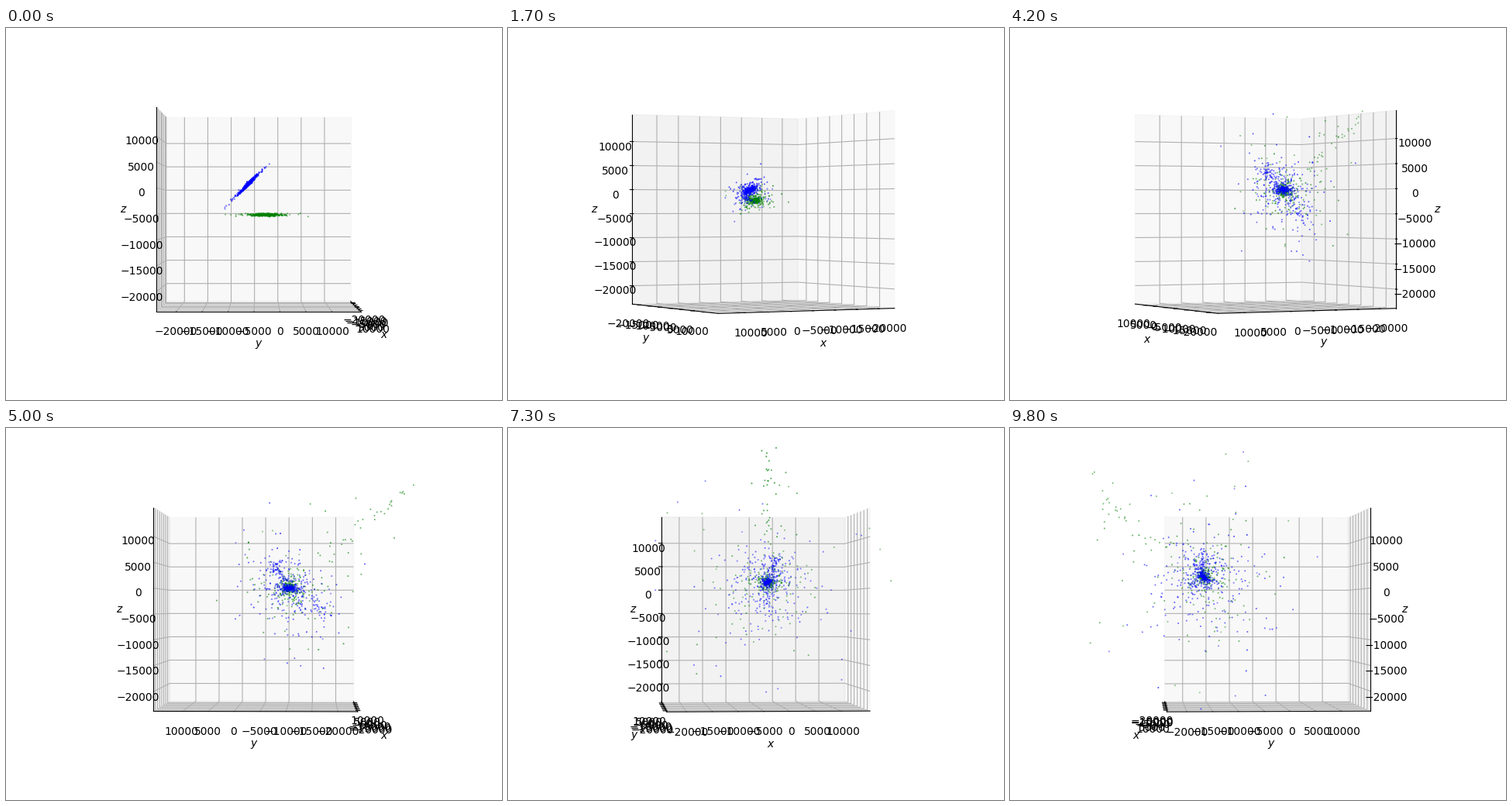
Recreate the animation shown at these times as a matplotlib script. Size 640 by 480 pixels, loop 9900 ms.

```python
import numpy as np
import matplotlib.pyplot as plt
from matplotlib.animation import FuncAnimation
from matplotlib.collections import LineCollection
from matplotlib.patches import Polygon, Rectangle

FRAMES, STEP_MS = 99, 100
W, H = 640, 480
VIEW = 0.924 * H                 # side of the square viewport, px
SHIFT = VIEW * (0.95 / 1.85 - 0.5)
CX, CY = W / 2 + SHIFT, H / 2 - SHIFT
DIST, ZOOM = 10, VIEW / 0.185
MID, SPAN = -4110, 37850         # data range of every axis
EDGE = 0.5 + 1 / 48
DELTA = 1 / 12
PER_POINT = 48 / (72 * 2 * VIEW / 100) * DELTA
TICK_OUT, LABEL_OUT = 11.5 * PER_POINT, 25 * PER_POINT
TICKS = np.arange(-20000, 10001, 5000)
UNITS = (TICKS - MID) / SPAN

rng = np.random.default_rng(12)

plt.rcParams["font.family"] = "DejaVu Sans"
fig = plt.figure(figsize=(6.4, 4.8), dpi=100, facecolor="white")
ax = fig.add_axes([0, 0, 1, 1])
ax.set_xlim(0, W)
ax.set_ylim(H, 0)
ax.axis("off")


def project(points, azim):
    """Perspective view at zero elevation: pixel x, pixel y, depth."""
    p = np.asarray(points, float)
    s, c = np.sin(azim), np.cos(azim)
    depth = c * p[..., 0] + s * p[..., 1]
    k = ZOOM / (DIST - depth)
    across = c * p[..., 1] - s * p[..., 0]
    return CX + across * k, CY - p[..., 2] * k, depth


def pixels(points, azim):
    x, y, _ = project(points, azim)
    return np.stack([x, y], axis=-1)


def unit(v):
    return v / np.linalg.norm(v, axis=-1, keepdims=True)


def smooth(u):
    u = np.clip(u, 0, 1)
    return u * u * (3 - 2 * u)


def track(t, times, keys):
    return np.array([np.interp(t, times, k) for k in np.transpose(keys)])


# ---- galaxies -------------------------------------------------------------

TAIL_TIMES = [1.0, 3.3, 5.0, 6.3, 8.4, 9.8]


class Galaxy:
    def __init__(self, n, scale, e1, e2, tails):
        self.e1, self.e2 = np.array(e1), np.array(e2)
        self.r = np.sort(rng.gamma(2, scale, n))
        self.phi = rng.uniform(0, 2 * np.pi, n)
        self.jitter = rng.normal(0, 140, (n, 3))
        bulge = 900 * np.abs(rng.normal(size=n))
        halo = 4200 * np.exp(0.75 * rng.normal(size=n))
        self.R = np.sort(np.where(rng.random(n) < 0.45, bulge, halo))
        self.R = np.minimum(self.R, 18000)
        self.u = unit(rng.normal(size=(n, 3)))
        self.v = unit(np.cross(self.u, rng.normal(size=(n, 3))))
        self.tails = []
        free = rng.permutation(n)
        for count, spread, keys in tails:
            idx, free = free[:count], free[count:]
            self.R[idx] = spread * np.abs(rng.normal(size=count))
            lag = rng.uniform(0.4, 1.35, (count, 1))
            self.tails.append((idx, lag, keys))

    def offsets(self, t):
        a = (self.phi + 2500 * t / (self.r + 900))[:, None]
        disk = self.r[:, None] * (np.cos(a) * self.e1 + np.sin(a) * self.e2)
        b = (self.phi + 2500 * t / (self.R + 600))[:, None]
        size = self.R * (1 + 0.2 * (t - 5) * self.R / (self.R + 5000))
        halo = size[:, None] * (np.cos(b) * self.u + np.sin(b) * self.v)
        w = smooth((t - 0.5) / 2.7)
        out = (disk + self.jitter) * (1 - w) + halo * w
        for idx, lag, keys in self.tails:
            out[idx] += lag * track(t, TAIL_TIMES, keys)
        return out


plume = [(0, 0, 0), (-3200, -5800, 7300), (-700, -18700, 15600),
         (1300, -19700, 20000), (-4700, -18100, 17500), (-3700, -16000, 12400)]
upper_arm = [(0, 0, 0), (4000, 2500, 2200), (0, 2400, 4000),
             (1500, -1500, 4500), (500, 1000, 2500), (0, 0, 3000)]
lower_arm = [(0, 0, 0), (0, -500, -5500), (0, -6300, -4000),
             (0, 1000, -5500), (0, 500, -3000), (0, -2000, -2000)]

D = np.sqrt(0.5)
green = Galaxy(400, 1100, (1, 0, 0), (0, 1, 0), [(38, 4800, plume)])
blue = Galaxy(600, 850, (1, 0, 0), (0, D, D),
              [(65, 2000, upper_arm), (60, 3800, lower_arm)])


def cores(t):
    """Both centres, measured from the middle of the cube."""
    middle = np.array([700, -220 - 1205 * t, 2054 + 460 * t])
    gap = track(t, [0, 1.7, 3.3, 4.6],
                [(0, -3636, 6320), (600, -900, 2054), (900, 300, 950), (0, 0, 0)])
    return middle - gap / 2, middle + gap / 2


def flatten_core(x, y, centre, t):
    """Squeeze the inner stars into a slowly turning bar."""
    tilt = np.radians(np.interp(t, [0, 1.7, 3.3, 6.3, 8.4, 9.8],
                                [45, 34, 0, 0, 80, 135]))
    dx, dy = x - centre[0], y - centre[1]
    q = dx * np.sin(tilt) + dy * np.cos(tilt)
    cut = 0.6 * min(1, t / 1.5) * np.exp(-(dx**2 + dy**2) / 200)
    return x - cut * q * np.sin(tilt), y - cut * q * np.cos(tilt)


# ---- artists --------------------------------------------------------------

panes = []
for grey in (0.95, 0.90, 0.925):
    pane = Polygon(np.zeros((4, 2)), closed=True, lw=1, alpha=0.5,
                   fc=(grey,) * 3, ec=(grey,) * 3, zorder=1)
    panes.append(ax.add_patch(pane))

grid = LineCollection([], colors="#b0b0b0", linewidths=0.8, zorder=2)
marks = LineCollection([], colors="black", linewidths=0.8, zorder=3)
ax.add_collection(grid, autolim=False)
ax.add_collection(marks, autolim=False)
spines = [ax.plot([], [], color="black", lw=0.8, zorder=3)[0] for _ in range(3)]

tick_texts = [[ax.text(0, 0, str(v).replace("-", "\u2212"), fontsize=10,
                       ha="center", va="top", zorder=4) for v in TICKS]
              for _ in range(3)]
names = [ax.text(0, 0, f"${n}$", fontsize=10, ha="center", va="center", zorder=4)
         for n in "xyz"]

window = Rectangle(((W - VIEW) / 2, (H - VIEW) / 2), VIEW, VIEW,
                   transform=ax.transData)


def star_field(z):
    dots = ax.scatter([], [], s=2.2, linewidths=0, zorder=z)
    dots.set_clip_path(window)
    return dots


green_dots, blue_dots = star_field(5), star_field(6)


def moved_out(p, axis, amount):
    q = p.copy()
    for i in range(3):
        if i != axis:
            q[i] += amount if q[i] >= 0 else -amount
    return q


def draw_cube(azim):
    back = np.array([EDGE if np.cos(azim) < 0 else -EDGE,
                     EDGE if np.sin(azim) < 0 else -EDGE, -EDGE])
    grid_lines, tick_lines = [], []
    for i in range(3):
        j, k = [n for n in range(3) if n != i]

        corners = np.tile(back, (4, 1))
        corners[:, j] = np.array([-1, 1, 1, -1]) * EDGE
        corners[:, k] = np.array([-1, -1, 1, 1]) * EDGE
        panes[i].set_xy(pixels(corners, azim))

        # The spine sits on the edge flipped away from the back corner.
        side = 1 if i == 0 else 0
        edge = back.copy()
        edge[side] *= -1
        ends = np.tile(edge, (2, 1))
        ends[:, i] = -EDGE, EDGE
        spines[i].set_data(*pixels(ends, azim).T)

        sign = np.sign(back[side])
        for u, text in zip(UNITS, tick_texts[i]):
            path = np.tile(back, (3, 1))
            path[0, j] *= -1
            path[2, k] *= -1
            path[:, i] = u
            grid_lines.append(pixels(path, azim))

            spot = edge.copy()
            spot[i] = u
            mark = np.tile(spot, (2, 1))
            mark[:, side] += sign * DELTA * np.array([0.1, -0.2])
            tick_lines.append(pixels(mark, azim))
            text.set_position(pixels(moved_out(spot, i, TICK_OUT), azim))

        centre = edge.copy()
        centre[i] = 0
        names[i].set_position(pixels(moved_out(centre, i, LABEL_OUT), azim))
    grid.set_segments(grid_lines)
    marks.set_segments(tick_lines)


def show_stars(dots, x, y, depth, rgb):
    near = (depth - depth.min()) / np.ptp(depth)
    colors = np.empty((len(x), 4))
    colors[:, :3] = rgb
    colors[:, 3] = 0.7 * (0.5 + 0.5 * near)
    dots.set_offsets(np.column_stack([x, y]))
    dots.set_facecolors(colors)


def draw(i):
    t = i * STEP_MS / 1000
    azim = 2 * np.pi * i / FRAMES
    draw_cube(azim)
    green_core, blue_core = cores(t)

    stars = (green_core + green.offsets(t)) / SPAN
    show_stars(green_dots, *project(stars, azim), (0, 0.5, 0))

    x, y, depth = project((blue_core + blue.offsets(t)) / SPAN, azim)
    x, y = flatten_core(x, y, pixels(blue_core / SPAN, azim), t)
    show_stars(blue_dots, x, y, depth, (0, 0, 1))
    return []


anim = FuncAnimation(fig, draw, frames=FRAMES, interval=STEP_MS, repeat=True)
plt.show()
```
